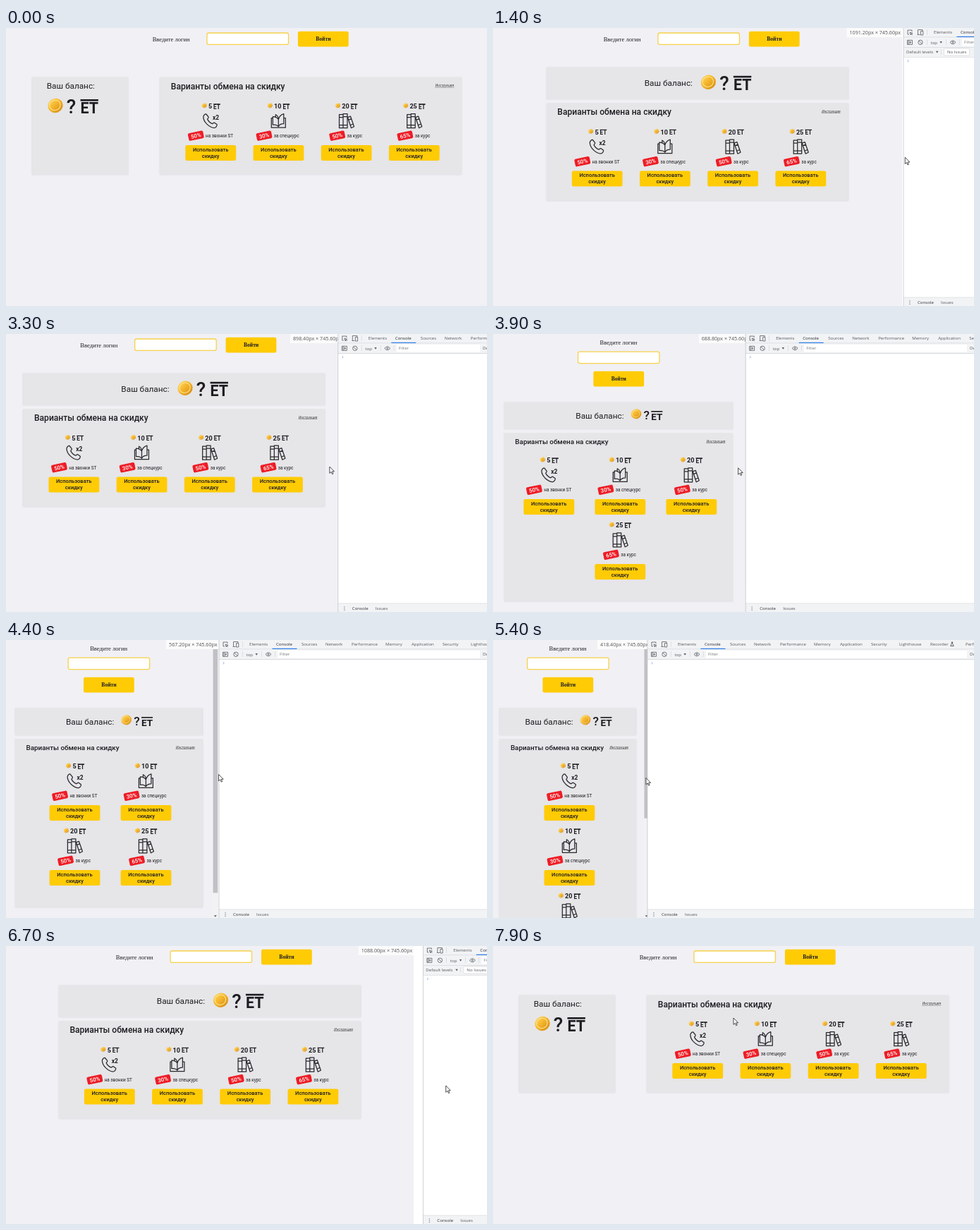
Recreate the animation shown at these times as an HTML page with a canvas. Size 682x394 px, loop 8000 ms.

```html
<!DOCTYPE html>
<html lang="ru">
<head>
<meta charset="utf-8">
<title>Адаптивная страница</title>
<style>
html, body { margin: 0; width: 100%; height: 100%; overflow: hidden; background: #f1f0f4; }
canvas { display: block; width: 682px; height: 394px; }
</style>
</head>
<body>
<canvas id="stage"></canvas>
<script>
const LOOP = 8000, STAGE_W = 682, STAGE_H = 394, CSS_SCALE = 1.8814;
const OPEN_AT = 1300, CLOSE_AT = 7100;
const SANS = 'Roboto, "Noto Sans", sans-serif';
const UI = '"Open Sans", "Noto Sans", sans-serif';
const SERIF = '"Liberation Serif", "Noto Serif", serif';
const INK = '#1d1c20', YELLOW = '#fecb05';

const canvas = document.getElementById('stage');
const ratio = window.devicePixelRatio || 1;
canvas.width = STAGE_W * ratio;
canvas.height = STAGE_H * ratio;
const ctx = canvas.getContext('2d');

// Motion: [time, value...]
const CURSOR = [
  [100, 690, 150], [900, 585, 180], [1300, 585, 180], [1700, 582, 193], [2300, 582, 193],
  [3300, 459, 188], [4150, 301.5, 190.5], [4500, 301.5, 190.5], [5400, 217, 195.5],
  [5700, 205, 196], [5950, 205, 196], [6700, 623.5, 198], [6850, 655, 196],
  [7200, 640, 180], [7700, 341, 108], [7900, 341, 102]
];
const DIVIDER = [
  [2300, 582], [3300, 471], [4200, 302], [4500, 302], [5400, 219],
  [5750, 205], [5950, 205], [6700, 591], [6880, 655]
];
const VIEWPORT = [
  [2300, 1091.2], [3300, 898.4], [4250, 567.2], [4500, 567.2], [5400, 418.4],
  [5800, 386.4], [5980, 386.4], [6700, 1087.2], [6950, 1232]
];

const PHONE = new Path2D('M-10.3-6C-9.8-8.5-7.5-10.2-6.3-9.7L-3-5.5C-2.5-4.5-4-3.5-4.5-2.5C-3.5 0 0 3.5 2.5 4C3.5 3.5 4.5 2 5.5 2.5L9 5C9.5 6.5 7.5 9.5 5.5 9.8C-1 9.8-10.3 2-10.3-6Z');
const BOOK = new Path2D('M-8-4H-10V9.5H10V-4H8M0 8C-2 5.5-5 5-8 5.5V-6C-5-6-2-5 0-2C1-6 4-9 7.5-10V4C4 4 1 6 0 8V-2M-4-5.5V-9C-2-8 0-6 0-2');
const BOOKS = new Path2D('M-10-9H-4.5V10H-10ZM-4.5-10H1.5V10H-4.5ZM2-5L6-6.5L11 8L7 10ZM-10-5H-4.5M-10 6H-4.5M-4.5-6H1.5M-4.5 6H1.5M3.5-1.5L7.3-3M5.8 6L10 4');
const POINTER = new Path2D('M0 0V9.3L2.2 7.4L3.7 10.7L5.2 10L3.7 6.8H6.6Z');

const OFFERS = [
  { price: '5', icon: PHONE, off: '50%', what: 'на звонки ST', shift: -7 },
  { price: '10', icon: BOOK, off: '30%', what: 'за спецкурс', shift: -6.5 },
  { price: '20', icon: BOOKS, off: '50%', what: 'за курс', shift: 1 },
  { price: '25', icon: BOOKS, off: '65%', what: 'за курс', shift: 1 }
];
const TABS = [
  ['Elements', 43], ['Console', 81], ['Sources', 117], ['Network', 151], ['Performance', 188],
  ['Memory', 236], ['Application', 273], ['Security', 317], ['Lighthouse', 357],
  ['Recorder', 401], ['Performance insights', 451]
];

function track(keys, t) {
  const i = keys.findIndex(k => k[0] > t);
  if (i === 0) return keys[0].slice(1);
  if (i < 0) return keys[keys.length - 1].slice(1);
  const a = keys[i - 1], b = keys[i], u = (t - a[0]) / (b[0] - a[0]);
  return a.slice(1).map((v, n) => v + (b[n + 1] - v) * u);
}

// y is the middle of the capital letters
function text(s, x, y, size, { font = SANS, weight = 400, color = INK, align = 'left' } = {}) {
  ctx.font = `${weight} ${size}px ${font}`;
  ctx.fillStyle = color;
  ctx.textAlign = align;
  ctx.fillText(s, x, y + size * 0.355);
}

function rect(x, y, w, h, color) {
  ctx.fillStyle = color;
  ctx.fillRect(x, y, w, h);
}

function rounded(x, y, w, h, r, fill, stroke) {
  ctx.beginPath();
  ctx.roundRect(x, y, w, h, r);
  if (fill) { ctx.fillStyle = fill; ctx.fill(); }
  if (stroke) { ctx.strokeStyle = stroke; ctx.stroke(); }
}

function line(d, x, y, color, width = 0.8) {
  ctx.save();
  ctx.translate(x, y);
  ctx.strokeStyle = color;
  ctx.lineWidth = width;
  ctx.lineJoin = 'round';
  ctx.stroke(d instanceof Path2D ? d : new Path2D(d));
  ctx.restore();
}

function coin(x, y, r) {
  const shade = ctx.createLinearGradient(x - r, y - r, x + r, y + r);
  shade.addColorStop(0, '#ffe27a');
  shade.addColorStop(0.45, '#f5b62c');
  shade.addColorStop(1, '#cf8412');
  ctx.beginPath();
  ctx.ellipse(x, y, r, r * 0.93, -0.4, 0, 7);
  ctx.fillStyle = shade;
  ctx.fill();
  ctx.beginPath();
  ctx.ellipse(x - r * 0.05, y - r * 0.05, r * 0.72, r * 0.66, -0.4, 0, 7);
  ctx.strokeStyle = '#ffe48c';
  ctx.lineWidth = r * 0.1;
  ctx.stroke();
}

function currency(x, bottom, h) {
  const size = h * 1.07;
  text('ET', x, bottom - size * 0.355, size, { weight: 700 });
  rect(x, bottom - h, h * 1.27, h * 0.13, INK);
}

function panel(x, y, w, h) {
  ctx.save();
  ctx.shadowColor = 'rgba(90,85,100,.16)';
  ctx.shadowBlur = 2 * ratio;
  rect(x, y, w, h, '#e6e5e8');
  ctx.restore();
}

function login(c, stacked) {
  const fieldX = stacked ? c - 57.5 : c - 55.7, fieldY = stacked ? 25.7 : 7.5;
  const buttonX = stacked ? c - 35.7 : c + 73.2, buttonY = stacked ? 53.2 : 5.2;
  text('Введите логин', stacked ? c - 26.5 : c - 133, stacked ? 12.5 : 16, 8.5, { font: SERIF });
  ctx.lineWidth = 1.3;
  rounded(fieldX, fieldY, 115.5, 16.4, 2.5, '#fff', '#f8d14c');
  rounded(buttonX, buttonY, 71.8, 21.8, 2.5, YELLOW);
  text('Войти', buttonX + 36, buttonY + 11.1, 7.6, { font: SERIF, weight: 700, align: 'center' });
}

function balance(x, mid, coinX, coinY, big) {
  const bottom = coinY + (big ? 11 : 8.3), h = big ? 20 : 12.6;
  text('Ваш баланс:', x, mid, 11.8);
  coin(coinX, coinY, big ? 10.8 : 7.4);
  text('?', coinX + (big ? 15.8 : 10.5), bottom - h / 2, h * 1.38, { weight: 500 });
  currency(coinX + (big ? 35.5 : 21.3), bottom, h);
}

function offer(o, c, y) {
  const wide = o.price.length > 1;
  coin(c + (wide ? -12 : -8.9), y - 0.8, 3.5);
  text(o.price, c + (wide ? -6.3 : -3), y + 0.2, 9.1, { weight: 700 });
  currency(c + (wide ? 6.2 : 4), y + 4.2, 7.6);
  line(o.icon, c, y + 21, '#29282c', 1.25);
  if (o.icon === PHONE) text('x2', c + 3, y + 16, 8.4, { weight: 700 });

  ctx.save();
  ctx.translate(c + o.shift - 13.8, y + 42);
  ctx.rotate(-0.21);
  rounded(-10.9, -5.4, 21.8, 10.8, 2, '#ee1c25');
  text(o.off, 0, 0, 7.8, { weight: 500, color: '#fff', align: 'center' });
  ctx.restore();
  text(o.what, c + o.shift, y + 42.2, 6.35);

  rounded(c - 35.8, y + 55.2, 71.8, 22, 2.5, YELLOW);
  text('Использовать', c, y + 61.5, 7.5, { weight: 500, align: 'center' });
  text('скидку', c, y + 70.3, 7.5, { weight: 500, align: 'center' });
}

function offers(x, y, w, stacked) {
  const columns = Math.max(1, Math.min(4, Math.floor((w - 20) / 92)));
  const rows = Math.ceil(4 / columns);
  const step = columns === 4 ? 96.2 : 101;
  const height = (stacked ? 146 : 138) + (rows - 1) * 92;
  panel(x, y, w, height);
  text('Варианты обмена на скидку', x + 15.6, y + 12.5, stacked ? 9.85 : 12.05, { weight: 500 });
  text('Инструкция', x + w - 11, y + 11.5, 4.9, { align: 'right', color: '#444', weight: 'italic 400' });
  rect(x + w - 38, y + 13.8, 27, 0.5, '#555');
  OFFERS.forEach((o, i) => {
    const row = Math.floor(i / columns);
    const inRow = Math.min(columns, 4 - row * columns);
    const c = x + w / 2 + 2.2 + (i % columns - (inRow - 1) / 2) * step;
    offer(o, c, y + (stacked ? 38.3 : 40.7) + row * 92);
  });
  return y + height;
}

function scrollbar(right, contentH) {
  const x = right - 9.5;
  rect(x, 0, 9.5, STAGE_H, '#f2f1f4');
  rect(x + 1.6, 9, 6.6, (STAGE_H - 18) * STAGE_H / contentH, '#c1c0c4');
  ctx.fillStyle = '#555';
  ctx.fill(new Path2D(`M${x + 2.8} 390.2h4l-2 2.2z`));
}

// Draws everything inside the page and returns its lower end
function content(c, inner, stacked, split) {
  if (split) {
    panel(c - 303.3, 70.5, 136, 138);
    balance(c - 283, 82.7, c - 270.7, 110.5, true);
    return offers(c - 122.5, 70.5, 428, false);
  }
  const w = Math.min(428, inner * 0.91), x = c - w / 2;
  if (stacked) {
    panel(x, 97.3, w, 38.2);
    balance(c - 60.7, 116.2, c + 25, 113.8, false);
  } else {
    panel(x, 56.5, w, 45);
    balance(c - 75, 78.8, c + 15.7, 77.3, true);
  }
  return offers(x, stacked ? 141 : 107, w, stacked);
}

function page(width) {
  const stacked = width < 425, split = width > 639;
  const inner = stacked ? width - 9.5 : width, c = inner / 2;
  rect(0, 0, width, STAGE_H, '#f1f0f4');
  ctx.save();
  ctx.translate(-0.3, -0.5);
  login(c, stacked);
  const bottom = content(c, inner, stacked, split);
  ctx.restore();
  if (stacked) scrollbar(width, bottom + 45);
}

function sizeLabel(css, right) {
  const s = (Math.round(css / 0.8) * 0.8).toFixed(2) + 'px × 745.60px';
  const size = 7.15;
  ctx.font = `400 ${size}px ${UI}`;
  const w = ctx.measureText(s).width;
  rect(right - w - 6, 0, w + 6, 13, '#fbfbfc');
  text(s, right - 2, 6.2, size, { font: UI, color: '#555', align: 'right' });
}

function devtools(x) {
  const room = STAGE_W - x, tall = room < 150, top = tall ? 41 : 27;
  const grey = '#55585d', rule = '#d0d2d6';
  const ui = (s, dx, y, color = grey, size = 6.1) => text(s, x + dx, y, size, { font: UI, color });
  const arrow = (dx, y) => {
    ctx.fillStyle = grey;
    ctx.fill(new Path2D(`M${x + dx} ${y - 1.3}h3.4l-1.7 2.8z`));
  };
  rect(x, 0, room, STAGE_H, '#fff');
  rect(x, 0, room, top, '#f2f3f5');
  rect(x, 382, room, 12, '#f2f3f5');
  [12.6, 27, top, 381.6].forEach(y => rect(x, y, room, 0.6, rule));

  // Tabs
  line('M3-1V-3H-3V3H-1M0 0L4 1.4L2 2L1.4 4ZM2 2L4 4', x + 9, 6, grey);
  line('M-3 3V-3.5H3.5V-2M-4 3.5H0M1-1.5H4.3V4H1Z', x + 23.5, 6, grey);
  rect(x + 33, 2, 0.6, 8, rule);
  TABS.forEach(([name, dx]) => ui(name, dx, 6.1, name === 'Console' ? '#26282c' : grey));
  line('M-1-3H1M-.6-3V-1L-2.3 2.5H2.3L.6-1V-3', x + 432, 6, grey, 0.9);
  rect(x + 75.5, 11.8, 35, 1.1, '#1a73e8');

  // Console toolbar
  line('M-3.5-3H3.5V3H-3.5ZM-1.8-3V3M0-1.3V1.3L2 0Z', x + 9, 20.3, grey);
  line('M3.2 0A3.2 3.2 0 1 1-3.2 0A3.2 3.2 0 1 1 3.2 0M-2.2-2.2L2.2 2.2', x + 24, 20.3, grey);
  rect(x + 33, 16, 0.6, 8, rule);
  ui('top', 38.5, 20.5);
  arrow(51.5, 20.2);
  rect(x + 60, 16, 0.6, 8, rule);
  line('M-4 0Q0-5 4 0Q0 5-4 0M1 0A1 1 0 1 1-1 0A1 1 0 1 1 1 0', x + 70, 20.3, grey);
  rect(x + 79, 16, 0.6, 8, rule);
  rect(x + 83, 15, Math.max(589 - x, room - 83), 10.5, '#fff');
  ui('Filter', 86, 20.3, '#777');
  if (tall) {
    ui('Default levels', 4, 34.3);
    arrow(46, 34);
    rect(x + 53, 30, 0.6, 8, rule);
    ctx.lineWidth = 0.6;
    rounded(x + 57.5, 29, 36, 10, 1, '#fff', rule);
    ui('No Issues', 62, 34.3);
  } else {
    rect(672, 13.2, 10, 13.8, '#f2f3f5');
    text('Default levels', 676, 20.3, 6.1, { font: UI, color: grey });
  }

  line('M-.8-1.5L.8 0L-.8 1.5', x + 6.5, top + 5.7, '#5a8dee', 0.7);
  [-2.3, 0, 2.3].forEach(dy => rect(x + 8.5, 388.6 + dy, 1, 1, grey));
  ui('Console', 20, 389.1, '#2e3034');
  ui('Issues', 53, 389.1);
  rect(x - 0.4, 0, 0.8, STAGE_H, '#c3c5ca');
}

function pointer(x, y) {
  ctx.save();
  ctx.translate(x, y);
  ctx.fillStyle = '#fff';
  ctx.fill(POINTER);
  ctx.restore();
  line(POINTER, x, y, '#222', 0.8);
}

function draw(t) {
  ctx.setTransform(ratio, 0, 0, ratio, 0, 0);
  rect(0, 0, STAGE_W, STAGE_H, '#fff');
  if (t < OPEN_AT || t >= CLOSE_AT) {
    page(STAGE_W);
  } else {
    const [css] = track(VIEWPORT, t), [edge] = track(DIVIDER, t);
    const width = css / CSS_SCALE;
    page(width);
    rect(width, 0, STAGE_W, STAGE_H, '#fff');
    sizeLabel(css, width);
    devtools(edge);
  }
  pointer(...track(CURSOR, t));
}

function tick(now) {
  draw(now % LOOP);
  requestAnimationFrame(tick);
}
requestAnimationFrame(tick);
</script>
</body>
</html>
```
